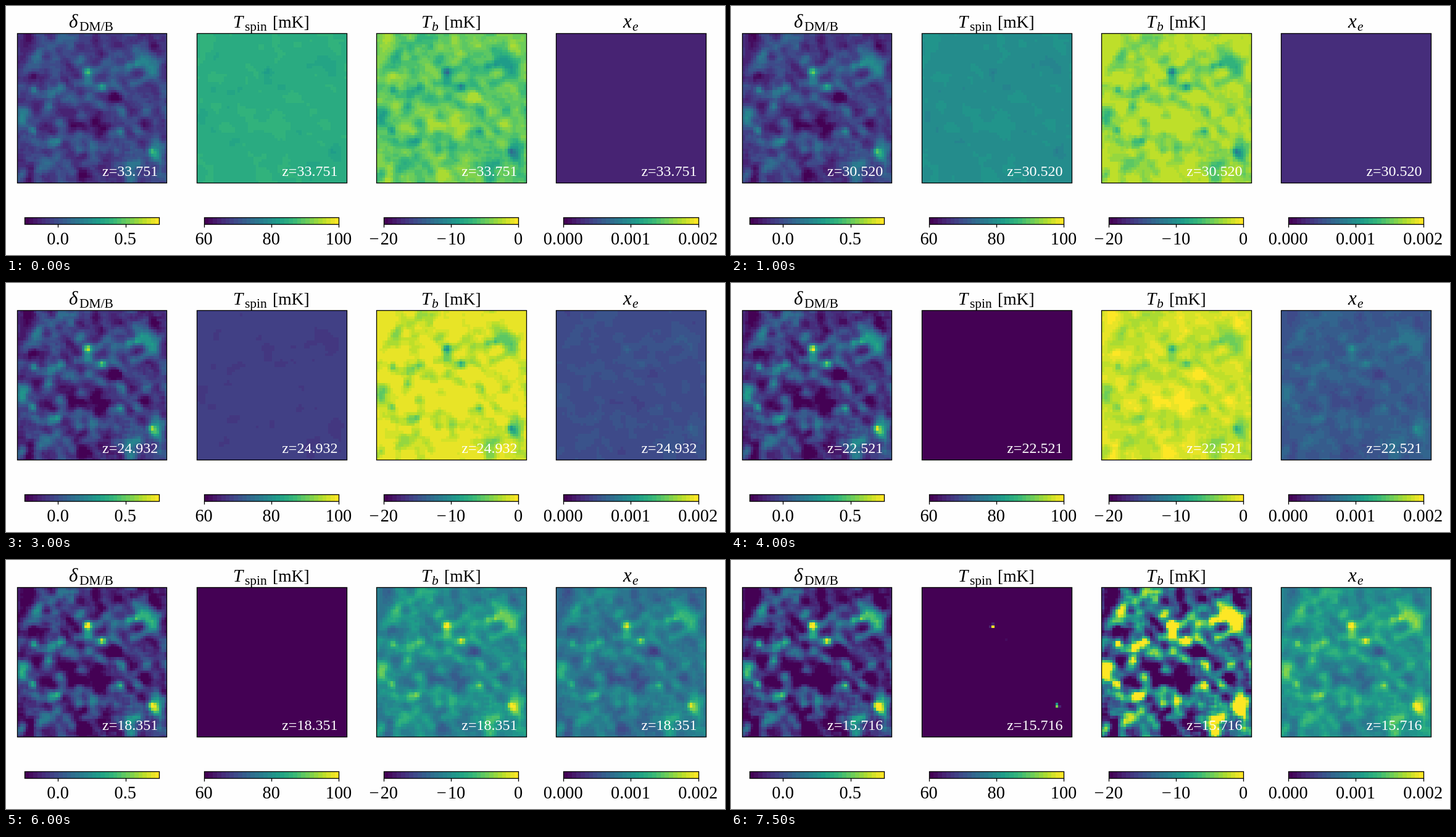
An HTML page with a canvas that plays this animation: 1165 by 403 pixels, repeating every 8 s.

```html
<!DOCTYPE html>
<html>
<head>
<meta charset="utf-8">
<style>
html, body { margin: 0; width: 100%; height: 100%; overflow: hidden; background: #fefefe; }
canvas { position: absolute; image-rendering: pixelated; }
svg { position: absolute; left: 0; top: 0; }
text { font-family: "Liberation Serif", "Times New Roman", serif; }
</style>
</head>
<body>
<script>
const N = 56, SIZE = 242.6, CELL = SIZE / N, LEVELS = 32, STEP = 500, STEPS = 16;
const clamp = (v, lo, hi) => Math.max(lo, Math.min(hi, v));
const snap = v => Math.floor(v) + 0.5;

// Colour map, reduced to a fixed number of levels
const stops = ['440154', '482878', '3e4989', '31688e', '26828e', '1f9e89', '35b779', '6ece58', 'b5de2b', 'fde725']
  .map(h => [0, 2, 4].map(k => parseInt(h.substr(k, 2), 16)));
const palette = Array.from({ length: LEVELS }, (_, i) => {
  const p = i / (LEVELS - 1) * (stops.length - 1), k = Math.min(p | 0, stops.length - 2);
  return stops[k].map((c, j) => Math.round(c + (stops[k + 1][j] - c) * (p - k)));
});
const colour = v => palette[clamp(Math.floor(v * LEVELS), 0, LEVELS - 1)];

// Density field: smooth noise shaped by a few landmarks
let seed = 11;
const random = () => (seed = seed * 16807 % 2147483647) / 2147483647;

function normalise(f) {
  const mean = f.reduce((a, b) => a + b) / f.length;
  const dev = Math.sqrt(f.reduce((a, b) => a + (b - mean) ** 2, 0) / f.length);
  return f.map(v => (v - mean) / dev);
}

function noise(passes) {
  let f = Array.from({ length: N * N }, () => random() - 0.5);
  while (passes--) f = f.map((_, i) => {
    let sum = 0;
    for (let dy = -1; dy < 2; dy++) for (let dx = -1; dx < 2; dx++)
      sum += f[((i / N | 0) + dy + N) % N * N + (i + dx + N) % N];
    return sum;
  });
  return normalise(f);
}

// Knots run from strongest to weakest
const knots = [[26, 91], [113, 61], [138, 86], [25, 157], [193, 50], [217, 191], [166, 157], [181, 52], [66, 175], [87, 20], [49, 117]];
const clouds = [[195, 50], [220, 185], [14, 140], [70, 95], [45, 187], [120, 70], [188, 215]];
const voids = [[127, 27], [127, 143], [127, 160], [20, 230], [108, 233], [90, 150], [155, 105], [15, 12], [220, 15]];
const blobs = [
  ...knots.map((p, k) => [...p, 4.5, 3.4 - 0.15 * k]),
  ...clouds.map(p => [...p, 14, 0.9]),
  ...voids.map(p => [...p, 10, -1.8])
];

const texture = noise(3);
const field = normalise(noise(2).map((v, i) => {
  const x = (i % N + 0.5) * CELL, y = ((i / N | 0) + 0.5) * CELL;
  return blobs.reduce((sum, [bx, by, r, amp]) =>
    sum + amp * Math.exp(-((x - bx) ** 2 + (y - by) ** 2) / (2 * r * r)), 0.75 * v);
}));
const peak = Math.max(...field);

// Static parts
const label = (x, y, size, s, extra = '') => `<text x="${x}" y="${y}" font-size="${size}" ${extra}>${s}</text>`;
const box = (x, y, w, h) => `<rect x="${snap(x)}" y="${snap(y)}" width="${snap(x + w) - snap(x)}"
  height="${snap(y + h) - snap(y)}" fill="none" stroke="#000" stroke-width="1.3"/>`;
const italic = 'font-style="italic"', middle = 'text-anchor="middle"';
const scales = [['0.0', '0.5'], ['60', '80', '100'], ['−\u200a20', '−\u200a10', '0'], ['0.000', '0.001', '0.002']];

let art = label(102, 35, 31, 'δ', italic) + label(119, 40, 21.5, 'DM/B') +
  label(368, 35, 29, 'T', italic) + label(387, 40, 21.5, 'spin') + label(432, 35, 27.5, '[mK]') +
  label(673, 35, 29, 'T', italic) + label(690, 40, 21.5, 'b', italic) + label(710, 35, 27.5, '[mK]') +
  label(1000, 35, 31, 'x', italic) + label(1015, 40, 21.5, 'e', italic);

const panels = scales.map((marks, i) => {
  const x = 18.3 + 291.1 * i, y = 44.1, bar = x + 12, w = 218.4;
  palette.forEach((c, k) => {
    art += `<rect x="${bar + k * w / LEVELS}" y="342.5" width="${w / LEVELS + .3}" height="11" fill="rgb(${c})" shape-rendering="crispEdges"/>`;
  });
  art += box(x, y, SIZE, SIZE) + box(bar, 342, w, 11);
  marks.forEach((s, k) => {
    const tx = bar + w * (marks.length === 2 ? 0.25 + k / 2 : k / 2);
    art += `<path d="M${snap(tx)} 353.5v5" stroke="#000" stroke-width="1.3"/>` + label(tx - .8, 386, 28.4, s, middle);
  });
  art += label(x + 228, 275, 24, '', 'class="z" fill="#fff" text-anchor="end"');
  const canvas = document.createElement('canvas');
  canvas.width = canvas.height = N;
  canvas.style.cssText = `left:${snap(x)}px;top:${snap(y)}px;width:${SIZE}px;height:${SIZE}px`;
  document.body.append(canvas);
  const ctx = canvas.getContext('2d');
  return { ctx, image: ctx.createImageData(N, N) };
});
document.body.insertAdjacentHTML('beforeend', `<svg width="1165" height="403">${art}</svg>`);
const zLabels = document.querySelectorAll('.z');

function draw(n) {
  const growth = 1.05 ** n, s = 0.085 * growth;
  const density = g => Math.exp(s * (g - 0.35) - s * s / 2) - 1;
  const top = density(peak);

  // Gas cools, then the densest cells heat up
  const spinBase = Math.max(-0.05, 0.61 - 0.057 * n - 0.0021 * n * n);
  const spinGain = -0.14 * Math.max(0, 1 - n / 9);
  const heat = 1.15 * Math.exp(1.3 * (n - 15));

  // Brightness rises, falls, and its response to density changes sign
  const brightBase = n < 6 ? 0.9 - 0.0055 * (n - 6) ** 2 : 0.9 - 0.37 * clamp((n - 7) / 5, 0, 1) ** 2;
  const brightGain = -0.8 + 0.00083 * n ** 3;
  const brightCap = 0.87 + 0.015 * n;
  const patchy = 0.014 * Math.max(0, 1 - Math.abs(n - 10) / 2);

  const ionBase = 0.105 + 0.02 * n + 0.0007 * n * n;
  const ionGain = 0.55 * Math.min(1, (n / 10) ** 3);

  field.forEach((g, i) => {
    const d = density(g);
    const values = [
      d + 0.25,
      spinBase + spinGain * d + heat * Math.max(0, d / top) ** 7,
      Math.min(brightCap, brightBase + brightGain * d + patchy * texture[i]),
      ionBase + ionGain * d
    ];
    values.forEach((v, p) => panels[p].image.data.set([...colour(v), 255], i * 4));
  });
  panels.forEach(p => p.ctx.putImageData(p.image, 0, 0));
  zLabels.forEach(t => t.textContent = 'z=' + (34.751 / growth - 1).toFixed(3));
}

let shown = -1;
const start = performance.now();
function tick() {
  const n = Math.floor((performance.now() - start) / STEP) % STEPS;
  if (n !== shown) draw(shown = n);
  requestAnimationFrame(tick);
}
tick();
</script>
</body>
</html>
```
